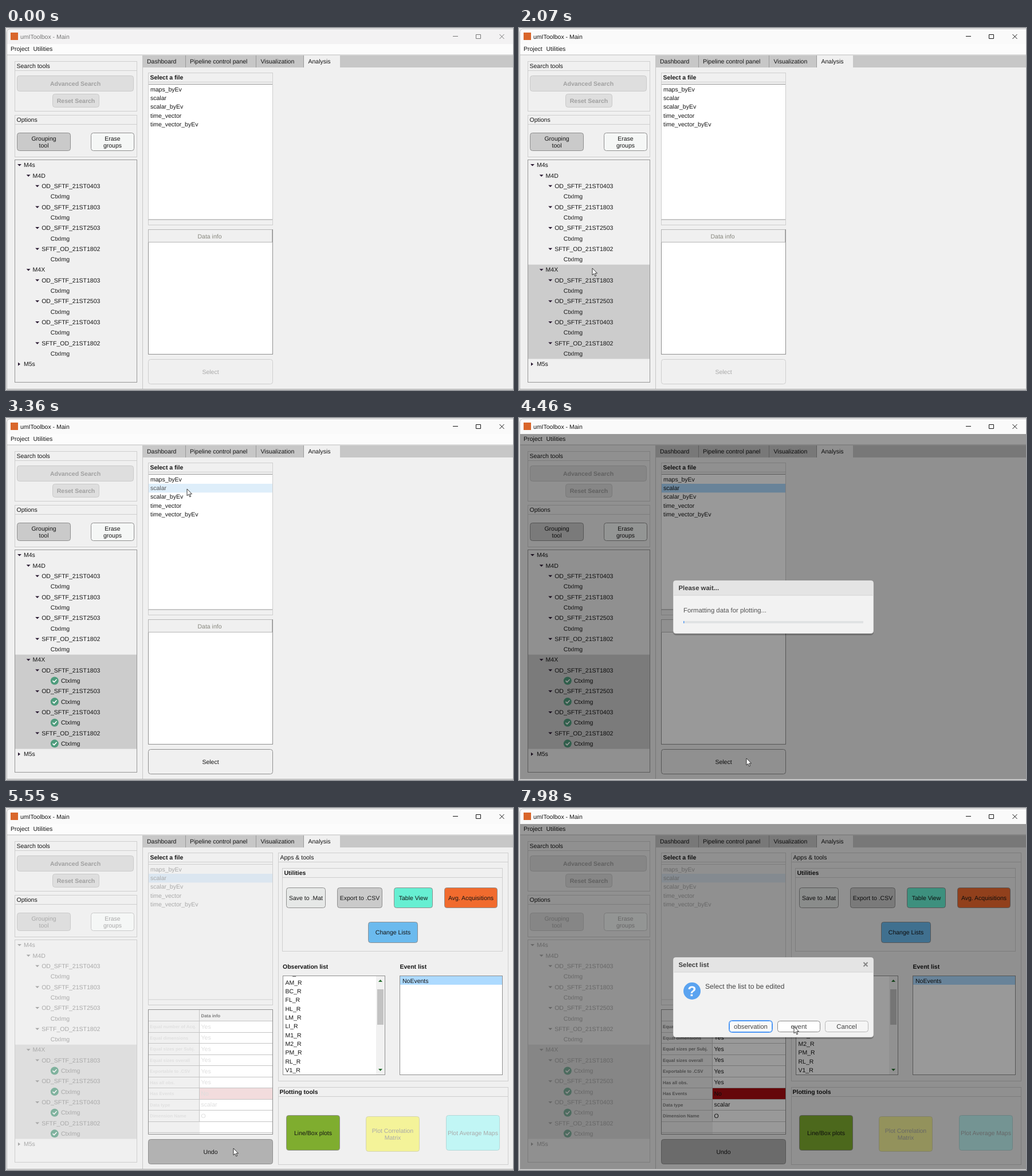
Recreate the animation shown at these times as an HTML page. Size 885 by 633 pixels, loop 8000 ms.

```html
<!DOCTYPE html>
<html lang="en">
<head>
<meta charset="utf-8">
<title>umIToolbox - Main</title>
<style>
  html, body { margin: 0; width: 100%; height: 100%; overflow: hidden; background: #f0f0f0; }
  svg { display: block; width: 885px; height: 633px; }
  text { font: 10.5px "Liberation Sans", Arial, sans-serif; text-rendering: geometricPrecision; white-space: pre; }
  .b { font-weight: bold; }
  .m { text-anchor: middle; }
</style>
</head>
<body>
<svg id="stage" viewBox="0 0 885 633"></svg>
<script>
const LOOP = 8000;
const BG = '#f0f0f0', INK = '#151515', OFF = '#a9a9a9', LINE = '#cecece', EDGE = '#8f8f8f';
const HOVER = '#deeefa', PICKED = '#addaff';
const FILES = ['maps_byEv', 'scalar', 'scalar_byEv', 'time_vector', 'time_vector_byEv'];
const TREE = [[0, 'M4s']];
for (const [group, ids] of [
  ['M4D', ['OD_SFTF_21ST0403', 'OD_SFTF_21ST1803', 'OD_SFTF_21ST2503', 'SFTF_OD_21ST1802']],
  ['M4X', ['OD_SFTF_21ST1803', 'OD_SFTF_21ST2503', 'OD_SFTF_21ST0403', 'SFTF_OD_21ST1802']],
]) {
  TREE.push([1, group]);
  for (const id of ids) TREE.push([2, id], [3, 'CtxImg']);
}
TREE.push([0, 'M5s']);
const ROW = 18.32, GROUP_ROW = 10;
const INFO = [['Equal number of Acq.', 'Yes'], ['Equal dimensions', 'Yes'], ['Equal sizes per Subj.', 'Yes'],
  ['Equal sizes overall', 'Yes'], ['Exportable to .CSV', 'Yes'], ['Has all obs.', 'Yes'],
  ['Has Events', 'No'], ['Data type', 'scalar'], ['Dimension Name', 'O']];
const REGIONS = ['AL_R', 'AM_R', 'BC_R', 'FL_R', 'HL_R', 'LM_R', 'LI_R', 'M1_R', 'M2_R', 'PM_R', 'RL_R', 'V1_R'];

// Pointer stops: time, x, y
const PATH = [[730, 508, 610], [1100, 290, 505], [1480, 128, 420], [2090, 128, 420], [2350, 306, 147],
  [2420, 314, 109], [2600, 314, 109], [2820, 316, 117], [3090, 316, 117], [3290, 316, 124],
  [3430, 316, 124], [4100, 397, 595], [6140, 397, 595], [6490, 650, 266], [6800, 671, 216],
  [7540, 671, 216], [7980, 480, 382]];

const clamp = v => Math.max(0, Math.min(1, v));
const mix = (a, b, k) => a + (b - a) * k;
const shown = (t, from, to) => clamp((t - from) / 100) * clamp((to - t) / 80);

function pointerAt(t) {
  if (t < PATH[0][0]) return null;
  const i = PATH.findIndex(p => p[0] > t);
  if (i < 0) return PATH.at(-1).slice(1);
  const [t0, x0, y0] = PATH[i - 1], [t1, x1, y1] = PATH[i];
  const k = Math.sin((t - t0) / (t1 - t0) * Math.PI / 2);
  return [mix(x0, x1, k), mix(y0, y1, k)];
}

const fill = (x, y, w, h, color, more = '') =>
  `<rect x="${x}" y="${y}" width="${w}" height="${h}" fill="${color}" ${more}/>`;
const box = (x, y, x2, y2, color, stroke = LINE, r = 0) =>
  fill(x + .5, y + .5, x2 - x - 1, y2 - y - 1, color, `stroke="${stroke}" rx="${r}"`);
const path = (d, stroke, color = 'none', more = '') => `<path d="${d}" stroke="${stroke}" fill="${color}" ${more}/>`;
const label = (x, y, s, cls = '', color = INK, size = 10.5) =>
  `<text x="${x}" y="${y + size * .35}" class="${cls}" fill="${color}" style="font-size:${size}px">${s}</text>`;
const group = (s, opacity) => opacity > 0 ? `<g opacity="${opacity}">${s}</g>` : '';

function button(x, y, x2, y2, text, color, ink = INK, stroke = EDGE, cls = 'm') {
  const lines = text.split('|'), mid = (y + y2) / 2 - (lines.length - 1) * 6;
  return box(x, y, x2, y2, color, stroke, 4) +
    lines.map((s, i) => label((x + x2) / 2, mid + i * 12, s, cls, ink)).join('');
}

function panel(x, y, x2, y2, title, cls = '') {
  return box(x, y, x2, y2, 'none') + path(`M${x} ${y + 16.5}H${x2}`, LINE) + label(x + 3.5, y + 8.5, title, cls);
}

function windowFrame(active) {
  const ink = active ? INK : '#777';
  return fill(0, 0, 885, 633, BG) + fill(1, 1, 884, 27, active ? '#fafafa' : '#f3f2f3') +
    box(8, 8, 21, 21, '#d9662b', '#d9662b') + label(25, 15, 'umIToolbox - Main', '', ink) +
    path('M780 14.5h9M820.500 11.500h8v7h-8zM861.500 11l8 8m0-8l-8 8', ink) +
    fill(1, 28, 884, 19, '#fcfcfc') + label(8, 36, 'Project') + label(47.5, 36, 'Utilities') +
    path('M1 47H885', '#bdbdbd');
}

function tabs() {
  const names = [[246, 'Dashboard'], [321, 'Pipeline control panel'], [444.5, 'Visualization'], [527.5, 'Analysis']];
  return fill(239, 48, 646, 21, '#c7c7c7') + fill(520, 48, 63, 22, BG) +
    path('M313.500 48v21M436.500 48v21M519.500 48v21', '#999') + path('M238.500 48V632', '#c6c6c6') +
    names.map(([x, s]) => label(x, 58.5, s)).join('');
}

function sidebar(locked) {
  const gray = '#dedede', soft = '#cacaca', ink = locked ? OFF : INK, edge = locked ? soft : EDGE;
  return panel(15, 58, 229, 146, 'Search tools') +
    button(19, 83, 223, 111, 'Advanced Search', gray, '#a0a0a0', soft, 'b m') +
    button(81, 115, 163, 139, 'Reset Search', gray, '#a0a0a0', soft, 'b m') +
    panel(15, 152, 229, 226, 'Options') +
    button(19, 183, 113, 215, 'Grouping|tool', locked ? gray : '#cacaca', ink, edge) +
    button(148, 183, 224, 215, 'Erase|groups', '#f5f7f6', ink, edge);
}

function tree(disabled, grouped, checked, hoverRow) {
  const ink = disabled ? OFF : INK, top = i => 230.5 + i * ROW;
  let s = '';
  if (grouped) s += fill(15, top(GROUP_ROW), 213, ROW * 9, disabled ? '#dedede' : '#cccccc');
  if (hoverRow >= 0) s += box(15, Math.round(top(hoverRow)), 229, Math.round(top(hoverRow) + ROW) + 1, '#e0e6f0', '#bcd0e8');
  TREE.forEach(([level, name], i) => {
    const x = 31 + level * 15.6, y = 239.6 + i * ROW, ticked = checked && level === 3 && i > GROUP_ROW;
    if (level < 3) {
      const arrow = name === 'M5s' ? `M${x - 10} ${y - 3}v6l4-3z` : `M${x - 11} ${y - 1.5}h7l-3.500 3.500z`;
      s += path(arrow, 'none', disabled ? OFF : '#2b1b33');
    }
    if (ticked) s += group(`<circle cx="84.800" cy="${y}" r="7" fill="#4f9c7d"/>` +
      path(`M81.500 ${y}l2.500 2.500 4.500-5`, '#fff', 'none', 'stroke-width="1.600"'), disabled ? .65 : 1);
    s += label(ticked ? 96 : x, y, name, '', ink);
  });
  return s + box(15, 230, 229, 620, 'none', disabled ? LINE : '#979797');
}

function fileList(disabled, row, rowColor) {
  const ink = disabled ? OFF : INK, edge = disabled ? LINE : '#979797';
  return panel(248, 78, 466, 345, 'Select a file', 'b') + fill(248, 98, 217, 237, disabled ? BG : '#fff') +
    (row >= 0 ? fill(249, 115 + (row - 1) * 15.4, 216, 15.4, rowColor) : '') +
    path('M248 98.500H465M248 335H465', edge) + path('M248.500 98V335M465.500 98V335', LINE) +
    FILES.map((s, i) => label(252, 107 + i * 15.4, s, '', i === row && rowColor === HOVER ? '#555' : ink)).join('');
}

function emptyInfo() {
  return box(248, 352, 466, 571, '#fff', EDGE) + box(248, 352, 465, 375, BG, '#b5b5b5') +
    label(355.5, 364, 'Data info', 'm', '#85857c');
}

function infoTable(opacity) {
  const rule = '#c4c4c4', gray = '#7d7d7d';
  let rows = '';
  INFO.forEach(([name, value], i) => {
    const y = 382.3 + i * 19.5;
    if (value === 'No') rows += fill(338, y - 9.3, 127, 19, '#a80c10');
    rows += label(251, y, name, 'b', gray, 7.85) + label(340.5, y - .3, value);
  });
  let lines = 'M337.500 353V549';
  for (let i = 0; i < 11; i++) lines += `M248 ${Math.round(372 + i * 19.5) + .5}H465`;
  return fill(248, 352, 217, 219, '#fff') + fill(248, 352, 90, 219, BG) + fill(338, 352, 127, 20, BG) +
    label(340.5, 363, 'Data info', 'b', gray, 7.85) + group(rows, opacity) +
    path(lines, rule) + box(248, 352, 466, 571, 'none', EDGE);
}

function tools(hot) {
  const list = REGIONS.map((s, i) => label(487.5, 289.7 + i * 15.33, s)).join('');
  return panel(475, 78, 877, 478, 'Apps &amp; tools') + panel(482, 105, 867, 251, 'Utilities', 'b') +
    button(489, 139, 558, 175, 'Save to .Mat', '#e6e8e7') +
    button(578, 139, 657, 175, 'Export to .CSV', '#cacaca') +
    button(677, 139, 745, 175, 'Table View', '#66efd2') +
    button(765, 139, 858, 175, 'Avg. Acquisitions', '#f16b2e') +
    button(632, 199, 719, 236, 'Change Lists', hot ? '#78c2f2' : '#6bbaee') +
    label(483, 277.5, 'Observation list', 'b') + label(687.5, 277.5, 'Event list', 'b') +
    box(483, 293, 662, 467, '#fff', EDGE) +
    `<svg x="484" y="294" width="162" height="172" viewBox="484 294 162 172">${list}</svg>` +
    fill(646, 294, 15, 172, '#f1f1f1') + fill(648, 317, 11, 62, '#c2c2c2') +
    path('M650 304h7l-3.500-4zM650 456h7l-3.500 4z', 'none', '#27702f') +
    box(687, 293, 867, 467, '#fff', EDGE) + fill(688, 294, 178, 15, PICKED) + label(692, 302, 'NoEvents') +
    panel(475, 488, 877, 624, 'Plotting tools', 'b').replace(/x="478.5"/, 'x="477.500"') +
    button(489, 537, 583, 599, 'Line/Box plots', '#7fad2f') +
    button(628, 539, 722, 601, 'Plot Correlation|Matrix', '#f4f399', OFF, '#d5d5b0') +
    button(768, 537, 862, 599, 'Plot Average Maps', '#c1f6f5', OFF, '#b5d8d8');
}

function dialog(y, y2, title, body) {
  return fill(0, 28, 885, 604, '#000', 'opacity=".4"') +
    fill(269, y + 1, 350, y2 - y + 2, '#000', 'rx="5" opacity=".22"') +
    box(269, y, 619, y2, '#f2f2f2', '#dcdcdc', 4) + fill(270, y + 1, 348, 25, '#e4e4e4', 'rx="3"') +
    path(`M270 ${y + 26}H618`, '#d2d2d2') + label(278.5, y + 13, title, 'b', '#3c3c3c', 11.35) + body;
}

function waitDialog(message, progress) {
  return dialog(284, 377, 'Please wait...', label(287, 336, message, '', '#555', 11.35) +
    fill(287, 355, 314, 4, '#e0e2e3') + fill(287, 355, 314 * progress, 4, '#4c97f5'));
}

function listDialog(hot) {
  const choice = (x, x2, s, color, stroke) =>
    box(x, 372, x2, 392, color, stroke, 4) + label((x + x2) / 2, 382, s, 'm', '#444', 11.4);
  return dialog(261, 401, 'Select list', path('M601.500 270l7 7m0-7l-7 7', '#858585', 'none', 'stroke-width="2"') +
    '<circle cx="302" cy="320" r="15" fill="#5aa3f0"/>' + label(302, 320.5, '?', 'b m', '#fff', 25) +
    label(325, 312, 'Select the list to be edited', '', '#444', 12.1) +
    choice(367, 442, 'observation', '#fafafa', '#4c97f5') + box(366, 371, 443, 393, 'none', '#4c97f5', 5) +
    choice(451, 526, 'event', hot ? '#fff' : '#f5f5f5', hot ? '#8a8a8a' : '#b8b8b8') +
    choice(534, 610, 'Cancel', '#f5f5f5', '#b8b8b8'));
}

function pointer([x, y]) {
  return path('M0 0V12L2.800 9.500 4.800 14 6.700 13.200 4.700 8.900H8.500Z', '#222', '#fff',
    `stroke-width=".9" transform="translate(${x} ${y})"`);
}

function scene(t) {
  const at = pointerAt(t), [px, py] = at || [-1, -1];
  const over = (x, y, x2, y2) => px >= x && px < x2 && py >= y && py < y2;
  const loaded = t >= 5210, picked = t >= 3400;
  const treeRow = t < 2000 && over(15, 231, 228, 590) ? Math.floor((py - 230.5) / ROW) : -1;
  const fileRow = t >= 2820 ? 1 : over(249, 100, 465, 176) ? Math.floor((py - 99.6) / 15.4) : -1;
  const undo = t >= 4720, ready = t >= 3290;

  let s = windowFrame(t >= 1590) + tabs() + sidebar(undo) +
    tree((t >= 1590 && t < 2000) || loaded, t >= 2000, ready, treeRow) +
    fileList(loaded, fileRow, loaded ? '#dbe6f0' : picked ? PICKED : HOVER) +
    (loaded ? infoTable(clamp((t - 5540) / 80)) : emptyInfo()) +
    button(248, 579, 466, 623, undo ? 'Undo' : 'Select',
      undo ? '#b2b2b2' : BG, ready ? INK : OFF, ready ? EDGE : LINE) +
    (loaded ? tools(over(632, 199, 719, 236)) : '');

  s += group(waitDialog('', 0), shown(t, 1720, 2000) + shown(t, 3070, 3340));
  s += group(waitDialog('Formatting data for plotting...', .217 * clamp((t - 4450) / 550)), shown(t, 4300, 5240));
  s += group(listDialog(over(451, 372, 526, 392)), clamp((t - 6940) / 90));
  if (at) s += pointer(at);
  return s + path('M1.500 633V8Q1.500 1.500 8 1.500H885', '#b9b9b9') + path('M1 631.500H885', '#a8a8a8') +
    path('M0 0H8Q1 1 1 8V633H0Z', 'none', '#e6e6e6') + fill(0, 632, 885, 1, '#dcdcdc');
}

const stage = document.getElementById('stage');
let last = '';
function draw(now) {
  const next = scene(now % LOOP);
  if (next !== last) stage.innerHTML = last = next;
  requestAnimationFrame(draw);
}
draw(performance.now());
</script>
</body>
</html>
```
